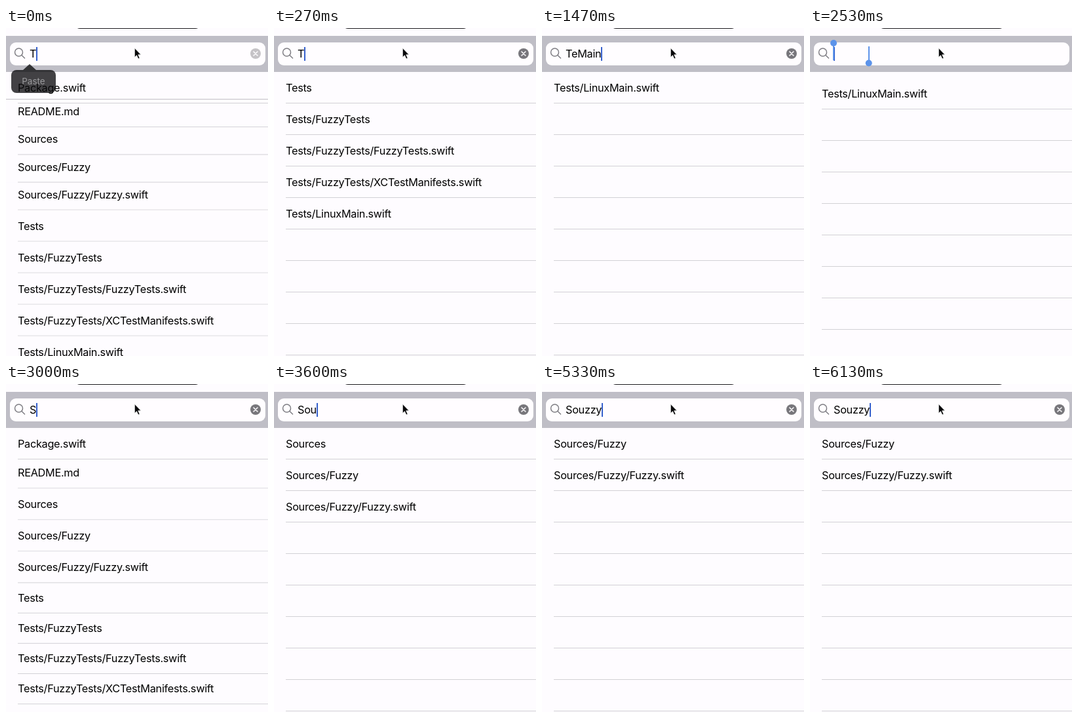
An HTML page that plays this animation: 400 by 500 pixels, repeating every 6340 ms.

```html
<!DOCTYPE html>
<html lang="en">
<head>
<meta charset="utf-8">
<title>Fuzzy file search</title>
<style>
  html, body { margin: 0; width: 100%; height: 100%; overflow: hidden; }
  body { position: relative; background: #fefcff; color: #000; font: 16.3px/48px Inter, "Liberation Sans", sans-serif; letter-spacing: -.3px; }
  div, svg { position: absolute; }
  #notch { left: 104px; top: -20px; width: 194px; height: 21px; border-radius: 9px; background: #1b1a1d; }
  #bar { left: 0; top: 12px; width: 400px; height: 55px; background: #bfbec6; }
  #field { left: 6px; top: 22px; width: 390px; height: 35px; border-radius: 9px; background: #fffdff; }
  #query { left: 36px; top: 22px; line-height: 34px; white-space: nowrap; }
  #typed { padding: 1px 0; }
  #caret { display: inline-block; width: 2px; height: 21px; margin-left: -.4px; vertical-align: -5px; background: #3560cc; }
  #list { left: 0; top: 67px; width: 400px; height: 433px; overflow: hidden; isolation: isolate; }
  .row { left: 0; top: 0; width: 382px; height: 48px; padding-left: 18px; background: #fefcff; white-space: nowrap; }
  .row::after { content: ""; position: absolute; left: 18px; right: 0; bottom: 0; height: 1px; background: #d2d1d5; }
  #blank { left: 0; top: 0; width: 400px; height: 480px; z-index: 30; background: #fefcff; }
  #blank::after { content: ""; position: absolute; left: 18px; right: 0; top: 0; bottom: 0;
    background: repeating-linear-gradient(transparent 0 47px, #d2d1d5 47px 48px); }
  #edge { left: 0; top: 47px; width: 400px; height: 1px; z-index: 25; background: #bfbec3; }
  #art { left: 0; top: 0; }
  #paste { left: 8px; top: 64px; width: 68px; height: 35px; border-radius: 8px; background: #0a0a0c; color: #7c7c7f;
    font-size: 13.5px; line-height: 35px; letter-spacing: 0; text-align: center; }
  #paste::before { content: ""; position: absolute; left: 18px; top: -9px; border: 10px solid transparent; border-top: 0; border-bottom: 9px solid #0a0a0c; }
</style>
</head>
<body>
<div id="notch"></div>
<div id="list"><div id="blank"></div><div id="edge"></div></div>
<div id="bar"></div>
<div id="field"></div>
<div id="query"><span id="typed"></span><span id="caret"></span></div>
<svg id="art" width="400" height="500" viewBox="0 0 400 500" fill="none">
  <g stroke="#7f7e84" stroke-width="1.5" stroke-linecap="round">
    <circle cx="19.5" cy="37" r="6"/>
    <path d="M24 41.5l4.5 4.5"/>
  </g>
  <g id="clear">
    <circle cx="381" cy="39" r="8" fill="#77767b"/>
    <path d="M378 36l6 6m0-6l-6 6" stroke="#fffdff" stroke-width="1.5" stroke-linecap="round"/>
  </g>
  <g id="grips" fill="#5b93ea">
    <path d="M35 23h2v26h-2zM89 28h2v26h-2z"/>
    <circle class="knob" cx="36" cy="23"/>
    <circle class="knob" cx="89.7" cy="53.5"/>
  </g>
  <path d="M196.3 30.5v14.2l3.2-3 2.4 5.3 2.3-1-2.4-5.2h4.4z" fill="#08080a" stroke="#fff" stroke-width=".8"/>
</svg>
<div id="paste">Paste</div>
<script>
const LOOP = 6340, ROW = 48, SLIDE = 300;
const $ = id => document.getElementById(id);
const files = [
  'Package.swift', 'README.md', 'Sources', 'Sources/Fuzzy', 'Sources/Fuzzy/Fuzzy.swift',
  'Tests', 'Tests/FuzzyTests', 'Tests/FuzzyTests/FuzzyTests.swift',
  'Tests/FuzzyTests/XCTestManifests.swift', 'Tests/LinuxMain.swift'
];
const rows = files.map(name => {
  const el = document.createElement('div');
  el.className = 'row';
  el.textContent = name;
  $('list').append(el);
  return el;
});
const knobs = document.querySelectorAll('.knob');

const keys = [
  [0, 'T'], [730, 'Te'], [894, 'TeM'], [1010, 'TeMa'], [1110, 'TeMai'], [1178, 'TeMain'],
  [2470, ''], [2960, 'S'], [3470, 'So'], [3590, 'Sou'], [4643, 'Souz'], [4780, 'Souzz'], [5130, 'Souzzy']
];
// list updates: start, query before, query after, moving top edge
const updates = [
  [-72, '', 'T', true], [894, 'Te', 'TeM', true], [1178, 'TeMai', 'TeMain', false],
  [2500, 'TeMain', '', false], [2960, '', 'S', false], [4643, 'Sou', 'Souz', true]
];
// caret: fade-out start, fade-in start
const blinks = [[1690, 1860], [3950, 4200], [5640, 5970]];

const clamp = x => Math.min(1, Math.max(0, x));
const ramp = (t, start, length) => clamp((t - start) / length);
const latest = (steps, t) => steps.filter(s => s[0] <= t).pop();

// cubic-bezier(.42, 0, .58, 1)
function ease(x) {
  let lo = 0, hi = 1, u = .5;
  for (let i = 0; i < 20; i++) {
    u = (lo + hi) / 2;
    const bx = 1.26 * u * (1 - u) ** 2 + 1.74 * u * u * (1 - u) + u ** 3;
    if (bx < x) lo = u; else hi = u;
  }
  return u * u * (3 - 2 * u);
}

function matches(query, name) {
  let at = -1;
  return [...query].every(c => (at = name.indexOf(c, at + 1)) >= 0);
}

function drawList(t) {
  const [start, before, after, edge] = latest(updates, t);
  const x = ramp(t, start, SLIDE);
  const p = x === 0 || x === 1 ? x : ease(x);
  const grows = after.length < before.length;
  const [wide, narrow] = grows ? [after, before] : [before, after];
  const closed = grows ? 1 - p : p;
  let index = 0, gone = 0;
  rows.forEach((el, i) => {
    const shown = matches(wide, files[i]), stays = matches(narrow, files[i]);
    el.style.display = shown && (stays || closed < 1) ? '' : 'none';
    if (!shown) return;
    if (!stays) gone++;
    const pinned = index === 0 && !stays;
    const y = pinned ? 0 : ROW * (index - closed * gone);
    el.style.transform = `translateY(${y}px)`;
    el.style.zIndex = stays ? 30 : 20 - i;
    index++;
  });
  $('blank').style.transform = `translateY(${ROW * (index - closed * gone)}px)`;
  $('edge').style.display = edge && x < 1 ? '' : 'none';
  $('edge').style.transform = `translateY(${-ROW * p}px)`;
}

function drawField(t) {
  const text = latest(keys, t)[1];
  const picked = ramp(t, 2000, 200);
  const selecting = t >= 2000 && t < 2470;
  if ($('typed').textContent !== text) $('typed').textContent = text;
  $('typed').style.background = selecting ? `rgba(60,115,240,${.2 * picked})` : '';

  let caret = 1;
  for (const [out, back] of blinks) caret -= ramp(t, out, 150) - ramp(t, back, 130);
  $('caret').style.opacity = selecting ? 0 : caret;

  $('grips').style.opacity = t < 2000 ? 0 : picked * (1 - ramp(t, 2530, 150));
  knobs.forEach(k => k.setAttribute('r', 5 * picked));
  $('clear').style.opacity = text ? .42 + .58 * ramp(t, 0, 200) : 0;
  $('paste').style.opacity = .77 * (1 - ramp(t, 0, 250));
}

const origin = performance.now();
function draw() {
  const t = (performance.now() - origin) % LOOP;
  drawList(t);
  drawField(t);
  requestAnimationFrame(draw);
}
draw();
</script>
</body>
</html>
```
